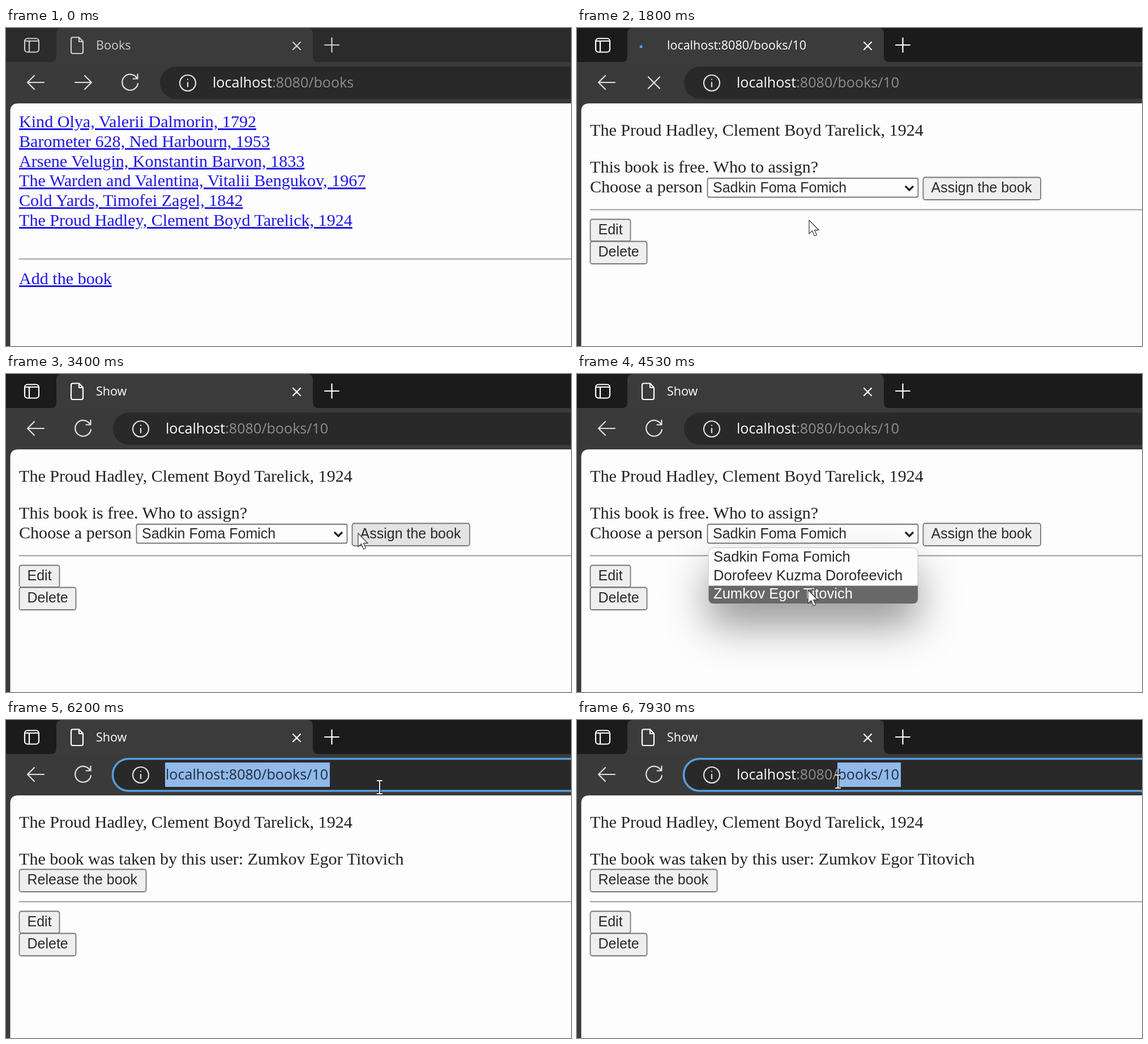
Write an HTML page that moves like this. It is 998x561 px and loops after 8 s.

```html
<!DOCTYPE html>
<html lang="en">
<head>
<meta charset="utf-8">
<title>Books</title>
<style>
  html, body { margin: 0; width: 100%; height: 100%; overflow: hidden; background: #3a3a3a; }
  svg { display: block; width: 100%; height: 100%; }
  text { white-space: pre; }
  .page { font: 30.1px "Liberation Serif", "Times New Roman", serif; fill: #222; }
  .link { fill: #1f17e4; text-decoration: underline; text-decoration-thickness: 2px; }
  .ui { font: 25px "Liberation Sans", Arial, sans-serif; fill: #2a2a2a; }
  .menu { font-size: 25.6px; }
  .tab { font: 21.5px "Open Sans", sans-serif; fill: var(--ink); }
  .url { font: 25.1px "Open Sans", sans-serif; }
  .icon { fill: none; stroke: #e2e2e2; stroke-width: 2.2; stroke-linecap: round; stroke-linejoin: round; }
  .top { stroke: var(--ink); }
  .button { fill: #efefef; stroke: #767676; stroke-width: 1.8; }
  .rule { fill: none; stroke: #a0a09a; stroke-width: 2; }
</style>
</head>
<body>
<svg id="stage" viewBox="0 0 998 561">
  <defs>
    <clipPath id="selectionClip"><rect id="clipBox" y="75" width="0" height="43"/></clipPath>
  </defs>

  <!-- Tab strip -->
  <rect id="strip" width="998" height="60"/>
  <path fill="#3b3b3b" d="M79 60q10 0 10-10V10q0-10 10-10H532q10 0 10 10V50q0 10 10 10V61H79z"/>
  <g class="icon top">
    <rect x="33" y="18.5" width="25" height="24" rx="5"/>
    <path d="M34 23H57M41 24V41M507 25l13 13M520 25l-13 13M563 30h25M575.5 17.5v25"/>
    <path id="document" d="M129 16.5H118q-3 0-3 3V42q0 3 3 3h15q3 0 3-3V24zV24h7"/>
  </g>
  <circle id="spinner" cx="125" cy="31" r="12" fill="none" stroke="#5a9fe8" stroke-width="5" stroke-linecap="round"/>
  <text id="title" class="tab" x="159" y="38"></text>

  <!-- Toolbar -->
  <g class="icon">
    <path d="M67 96H38M50 84L38 96L50 108"/>
    <path id="forward" d="M122 96h29M139 84l12 12l-12 12"/>
    <path id="stop" d="M126 86.5l20 20M146 86.5l-20 20"/>
  </g>
  <g id="address">
    <path id="reload" class="icon" d="M231.5 89A14 14 0 1 0 233 98M232.5 81.5V89.5H224.5"/>
    <rect x="272" y="68" width="900" height="57" rx="28.5" fill="#292929"/>
    <rect id="ring" x="271.5" y="68.5" width="900" height="56.5" rx="28" fill="none" stroke="#569fdc" stroke-width="3.6"/>
    <circle class="icon" cx="321" cy="97" r="14"/>
    <path class="icon" d="M321 96v7.5M321 90.5v.2"/>
    <text class="url" x="365" y="105" fill="#fff">localhost<tspan id="urlPath" fill="#8e8e8e"></tspan></text>
  </g>
  <g clip-path="url(#selectionClip)">
    <rect x="270" y="75" width="310" height="43" fill="#91b9e9"/>
    <text class="url" x="282" y="105" fill="#1d2c3d">localhost:8080/books/10</text>
  </g>

  <path fill="#fdfdfd" d="M7.5 561V147q0-14 14-14H998V561z"/>

  <!-- List of books -->
  <g id="list" class="page">
    <path class="rule" d="M22.5 407.5H998"/>
    <text class="link" x="23" y="452">Add the book</text>
  </g>

  <!-- One book -->
  <g id="book">
    <g class="page">
      <text id="bookName" x="23" y="190"></text>
      <path class="rule" d="M22.5 320.5H998"/>
    </g>
    <g id="free">
      <text class="page" x="23" y="255">This book is free. Who to assign?</text>
      <text class="page" x="23" y="290">Choose a person</text>
      <rect x="230.5" y="265" width="372" height="33.5" rx="3" fill="#fdfdfd" stroke="#767676" stroke-width="1.8"/>
      <text id="chosen" class="ui" x="240" y="290"></text>
      <path d="M580 279l7 7l7-7" fill="none" stroke="#222" stroke-width="3.2"/>
    </g>
    <g id="taken">
      <text id="owner" class="page" x="23" y="255"></text>
    </g>
  </g>

  <g id="menu">
    <rect x="232" y="306.500" width="370" height="98.500" rx="9" fill="#fdfdfd" stroke="#c4c4c4"
      style="filter:drop-shadow(0 38px 36px #0006)"/>
    <path id="highlight" fill="#686868"/>
  </g>

  <!-- Pointers -->
  <g id="pointer" stroke-linejoin="round">
    <path id="arrow" fill="#fff" stroke="#444" stroke-width="1.3" d="M0 0V24L5.500 18.500L9.500 28L13.500 26L9.500 17.500H17z"/>
    <path id="hand" fill="#fff" stroke="#333" stroke-width="1.5"
      d="M-2 2q0-3 2.500-3t2.500 3V11q4-2 5 1q4-2 5 1q4-1 4 3v5q0 4-3 8H0q-2-5-7-10q-2-3 1-4q2 0 4 3z"/>
    <g id="beam" fill="none">
      <path stroke="#222" stroke-width="4" d="M-5-11H5M0-11V12M-5 12H5"/>
      <path stroke="#eee" stroke-width="2" d="M-5-11H5M0-11V12M-5 12H5"/>
    </g>
  </g>
</svg>

<script>
const LOOP = 8000;
const FOCUS_WINDOW = 1500, OPEN_BOOK = 1700, BOOK_LOADED = 2050;
const MENU_OPEN = 3900, MENU_CLOSE = 4650;
const SUBMIT = 4930, ASSIGNED = 5080, ASSIGN_LOADED = 5350;
const FOCUS_URL = 6080, CLEAR_URL = 7000, DRAG = 7600;

const books = [
  "Kind Olya, Valerii Dalmorin, 1792",
  "Barometer 628, Ned Harbourn, 1953",
  "Arsene Velugin, Konstantin Barvon, 1833",
  "The Warden and Valentina, Vitalii Bengukov, 1967",
  "Cold Yards, Timofei Zagel, 1842",
  "The Proud Hadley, Clement Boyd Tarelick, 1924"
];
const people = ["Sadkin Foma Fomich", "Dorofeev Kuzma Dorofeevich", "Zumkov Egor Titovich"];

// Pointer path: time, x, y
const path = [
  [0, 428, 640], [720, 428, 600], [870, 420, 461], [1200, 410, 339], [2500, 410, 339],
  [3000, 660, 284], [3400, 622, 281], [3800, 500, 283], [4000, 500, 283],
  [4450, 408, 381], [4650, 408, 381], [4880, 690, 285], [5250, 690, 285],
  [5650, 650, 420], [6020, 660, 118], [6750, 660, 118], [7000, 674, 112],
  [7450, 604, 106], [7600, 604, 106], [7930, 461, 108], [8000, 461, 108]
];

const $ = id => document.getElementById(id);
const show = (id, visible) => { $(id).style.display = visible ? "" : "none"; };
const setText = (id, value) => { if ($(id).textContent !== value) $(id).textContent = value; };
const clamp = (v, low, high) => Math.max(low, Math.min(high, v));

function add(parent, tag, attributes, text = "") {
  const node = document.createElementNS("http://www.w3.org/2000/svg", tag);
  for (const name in attributes) node.setAttribute(name, attributes[name]);
  node.textContent = text;
  return $(parent).appendChild(node);
}

function button(parent, x, y, width, height, label) {
  const box = add(parent, "rect", { class: "button", x, y, width, height, rx: 3.5 });
  add(parent, "text", { class: "ui", x: x + 14, y: y + 26.5 }, label);
  return box;
}

books.forEach((name, i) => add("list", "text", { class: "link", x: 23, y: 175 + i * 34.8 }, name));
const items = people.map((name, i) => add("menu", "text", { class: "ui menu", x: 241, y: 331 + i * 32.5 }, name));
const assign = button("free", 611.5, 263.5, 207.5, 39.5, "Assign the book");
button("taken", 23.5, 263.5, 224, 39.5, "Release the book");
button("book", 23.5, 337.5, 71, 38.5, "Edit");
button("book", 23.5, 376.5, 100, 39.5, "Delete");
setText("bookName", books[5]);
setText("owner", "The book was taken by this user: " + people[2]);

function pointerAt(t) {
  const i = path.findIndex(point => point[0] > t);
  const [t0, x0, y0] = path[i - 1], [t1, x1, y1] = path[i];
  const k = (t - t0) / (t1 - t0), eased = k * k * (3 - 2 * k);
  return [x0 + (x1 - x0) * eased, y0 + (y1 - y0) * eased];
}

function drawChrome(t) {
  const active = t >= FOCUS_WINDOW, opened = t >= OPEN_BOOK;
  const start = t >= SUBMIT ? SUBMIT : OPEN_BOOK;
  const loading = t >= start && t < (start === SUBMIT ? ASSIGN_LOADED : BOOK_LOADED);
  const pending = loading && (t < BOOK_LOADED || t >= ASSIGNED);

  $("stage").style.setProperty("--ink", active ? "#fff" : "#cdcdcd");
  $("strip").setAttribute("fill", active ? "#1b1b1b" : "#2b2b2b");
  setText("title", pending ? "localhost:8080/books/10" : opened ? "Show" : "Books");
  setText("urlPath", opened ? ":8080/books/10" : ":8080/books");
  $("address").setAttribute("transform", `translate(${opened ? -83 : 0})`);
  show("forward", !opened);
  show("stop", loading);
  show("reload", !loading);
  show("document", !loading);
  show("spinner", loading);
  const age = Math.max(0, t - start - 100);
  $("spinner").setAttribute("stroke-dasharray", `${0.1 + age / 12} 200`);
  $("spinner").setAttribute("transform", `rotate(${170 + age * 0.3} 125 31)`);
}

function drawPage(t, x, y) {
  const menuOpen = t >= MENU_OPEN && t < MENU_CLOSE;
  show("list", t < OPEN_BOOK);
  show("book", t >= OPEN_BOOK);
  show("free", t < ASSIGNED);
  show("taken", t >= ASSIGNED);
  show("menu", menuOpen);
  setText("chosen", people[t < MENU_CLOSE ? 0 : 2]);

  const hovered = !menuOpen && x > 611 && x < 819 && y > 263 && y < 303;
  assign.style.fill = hovered ? "#e3e3e3" : "";

  const row = clamp(Math.floor((y - 308) / 32.6), 0, 2);
  items.forEach((item, i) => { item.style.fill = i === row ? "#fff" : ""; });
  $("highlight").setAttribute("d", [
    "M232.5 340V316q0-9 9-9H593q9 0 9 9V340z",
    "M232.5 340.5H602V373H232.5z",
    "M232.5 373.5H602V396q0 9-9 9H241.5q-9 0-9-9z"
  ][row]);
}

function drawSelection(t, x) {
  let left = 572;
  if (t >= FOCUS_URL && t < CLEAR_URL) left = 281;
  if (t >= DRAG) left = clamp(x - 1, 281, 572);
  $("clipBox").setAttribute("x", left);
  $("clipBox").setAttribute("width", 572 - left);
  show("ring", t >= FOCUS_URL);
}

function drawPointer(t, x, y) {
  const onLink = t < OPEN_BOOK && x < 615 && (y < 355 || (y > 426 && y < 460 && x < 187));
  const onUrl = y < 126;
  $("pointer").setAttribute("transform", `translate(${x} ${y})`);
  show("hand", onLink);
  show("beam", onUrl);
  show("arrow", !onLink && !onUrl);
}

function frame() {
  const t = performance.now() % LOOP;
  const [x, y] = pointerAt(t);
  drawChrome(t);
  drawPage(t, x, y);
  drawSelection(t, x);
  drawPointer(t, x, y);
  requestAnimationFrame(frame);
}
frame();
</script>
</body>
</html>
```
